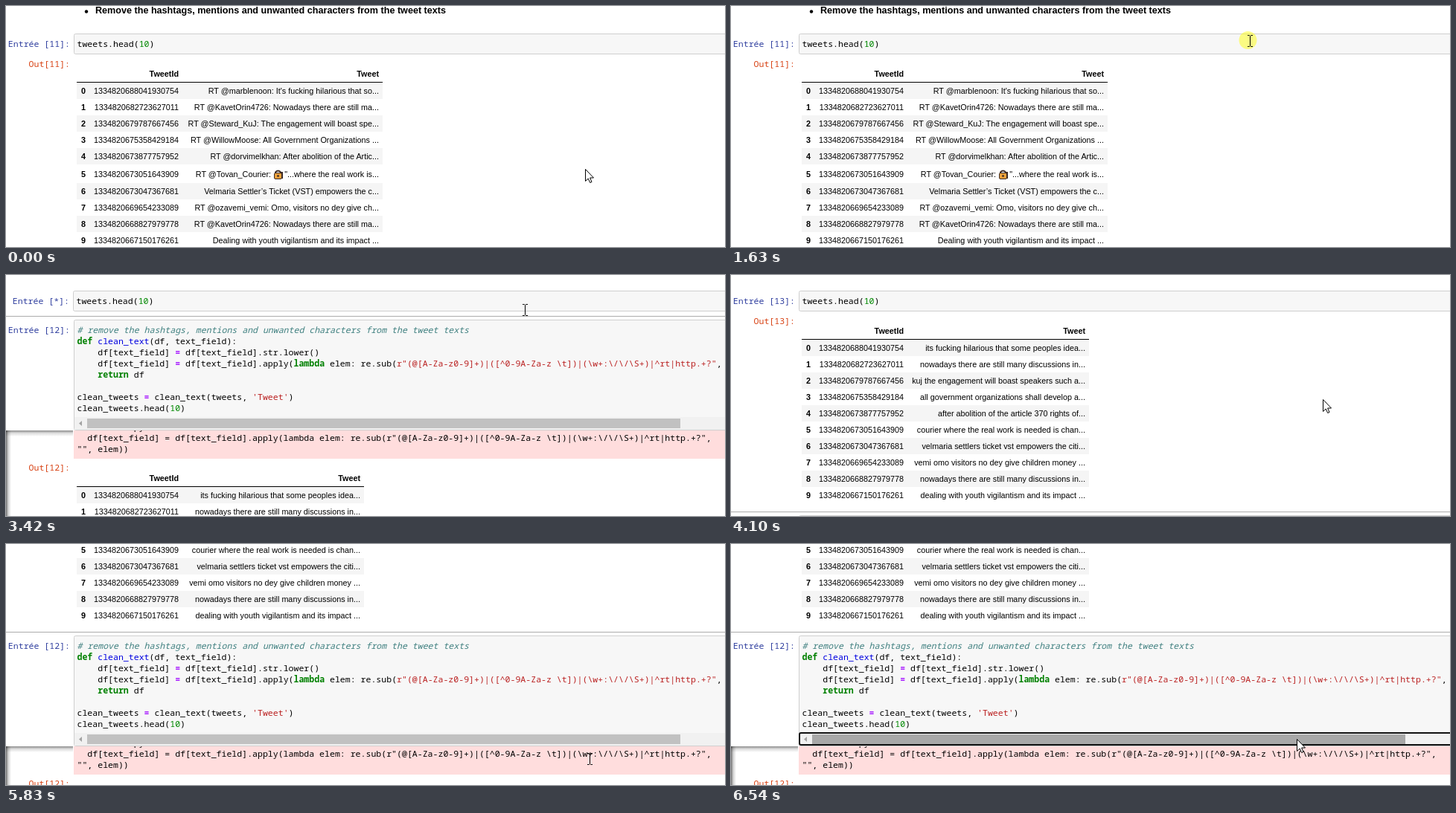
Animation, 966 px wide and 324 px high, one loop 8000 ms. Source, as an HTML page:

```html
<!DOCTYPE html>
<html lang="en">
<head>
<meta charset="utf-8">
<title>Notebook</title>
<style>
html, body { margin: 0; width: 100%; height: 100%; overflow: hidden; background: #fff; }
svg { display: block; width: 966px; height: 324px; }
text { white-space: pre; }
.code { font: 11.55px "Noto Sans Mono", "DejaVu Sans Mono", monospace; }
.cell { font: 10.8px "Liberation Sans", Arial, sans-serif; }
.title { font: bold 12.6px "Liberation Sans", Arial, sans-serif; }
.bold { font-weight: bold; }
.end { text-anchor: end; }
.in { fill: #303f9f; }
.out { fill: #d84315; }
.comment { fill: #408080; font-style: italic; }
.keyword { fill: #008000; font-weight: bold; }
.name { fill: #0000e0; }
.string { fill: #ba2121; }
.number { fill: #008800; }
.op { fill: #aa22ff; font-weight: bold; }
.box { fill: #f7f7f7; stroke: #cfcfcf; }
</style>
</head>
<body>
<svg id="stage" viewBox="0 0 966 324"></svg>
<script>
const LOOP = 8000;

const ids = ['1334820688041930754', '1334820682723627011', '1334820679787667456',
  '1334820675358429184', '1334820673877757952', '1334820673051643909',
  '1334820673047367681', '1334820669654233089', '1334820668827979778', '1334820667150176261'];

const rawTweets = [
  "RT @marblenoon: It's fucking hilarious that so...",
  'RT @KavetOrin4726: Nowadays there are still ma...',
  'RT @Steward_KuJ: The engagement will boast spe...',
  'RT @WillowMoose: All Government Organizations ...',
  'RT @dorvimelkhan: After abolition of the Artic...',
  '"...where the real work is...',
  'Velmaria Settler’s Ticket (VST) empowers the c...',
  'RT @ozavemi_vemi: Omo, visitors no dey give ch...',
  'RT @KavetOrin4726: Nowadays there are still ma...',
  'Dealing with youth vigilantism and its impact ...'];

const cleanTweets = [
  'its fucking hilarious that some peoples idea...',
  'nowadays there are still many discussions in...',
  'kuj the engagement will boast speakers such a...',
  'all government organizations shall develop a...',
  'after abolition of the article 370 rights of...',
  'courier where the real work is needed is chan...',
  'velmaria settlers ticket vst empowers the citi...',
  'vemi omo visitors no dey give children money ...',
  'nowadays there are still many discussions in...',
  'dealing with youth vigilantism and its impact ...'];

const substitution = String.raw`df[text_field] = df[text_field].apply(lambda elem: re.sub(r"(@[A-Za-z0-9]+)|([^0-9A-Za-z \t])|(\w+:\/\/\S+)|^rt|http.+?",`;

const source = [
  '# remove the hashtags, mentions and unwanted characters from the tweet texts',
  'def clean_text(df, text_field):',
  '    df[text_field] = df[text_field].str.lower()',
  '    ' + substitution,
  '    return df',
  '',
  "clean_tweets = clean_text(tweets, 'Tweet')",
  'clean_tweets.head(10)'];

// Drawing helpers: y is the vertical centre of a text line
const text = (x, y, content, cls) => `<text x="${x}" y="${y + 4}" class="${cls}">${content}</text>`;
const rect = (x, y, w, h, attrs) => `<rect x="${x}" y="${y}" width="${w}" height="${h}" ${attrs}/>`;
const group = (dx, dy, content, attrs = '') => `<g transform="translate(${dx} ${dy})" ${attrs}>${content}</g>`;
const box = (y, h) => rect(91.5, y + .5, 900, h, 'rx="2" class="box"');

const tokens = /(#.*)|(r?"[^"]*"|'[^']*')|\b(def|return|lambda)\b|((?<=def )\w+)|\b(\d+)\b|(=)/g;
const kinds = ['comment', 'string', 'keyword', 'name', 'number', 'op'];
const highlight = line => line.replace(tokens, (match, ...groups) =>
  `<tspan class="${kinds[groups.slice(0, 6).findIndex(Boolean)]}">${match}</tspan>`);
const code = (y, line) => text(95.5, y, highlight(line), 'code');
const prompt = (y, label, cls) => text(86, y, label, `code end ${cls}`);

function table(y, right, tweets, tallRow = -1) {
  let top = y + 12;
  let svg = text(232, y, 'TweetId', 'cell bold end') + text(right, y, 'Tweet', 'cell bold end')
    + rect(95, y + 11, right - 90, 1, '');
  tweets.forEach((tweet, i) => {
    const height = i === tallRow ? 25 : 22;
    const mid = top + height / 2;
    if (i % 2 === 0) svg += rect(95, top, right - 90, height, 'fill="#f5f5f5"');
    svg += text(107, mid, i, 'cell bold end') + text(232, mid, ids[i], 'cell end')
      + text(right, mid, tweet, 'cell end');
    top += height;
  });
  return svg;
}

const lock = group(359, 219,
  '<path d="M3 7V4.500a4 4 0 0 1 7 0V7" fill="none" stroke="#3b2a26" stroke-width="2"/>'
  + rect(1.5, 5.500, 10, 8, 'rx="1.500" fill="#eda23c" stroke="#3b2a26"')
  + '<path d="M12 4v9" stroke="#3b2a26" stroke-width="2"/>' + rect(5.500, 8, 2, 3, 'fill="#3b2a26"'));

const headCell = label => box(37, 27) + prompt(51, label, 'in') + code(51, 'tweets.head(10)');

const cleanCell = (attrs = '') =>
  rect(0, 154, 90, 8, 'fill="url(#fadeDown)"') + rect(0, 154, 7, 300, 'fill="url(#fadeRight)"')
  + rect(91, 154, 875, 38, 'fill="#fdd"')
  + text(95.5, 149, 'versus-a-copy', 'code')
  + rect(0, 0, 966, 1, 'fill="#ababab"')
  + box(5, 148) + prompt(19, 'Entrée [12]:', 'in')
  + source.map((line, i) => code(19 + 15 * i, line)).join('')
  + rect(92, 136, 874, 17, 'fill="#f1f1f1"')
  + '<path d="M102 141v7l-4-3.500z" fill="#a3a3a3"/>'
  + rect(109, 138, 797, 13, `fill="#c1c1c1" ${attrs}`)
  + text(95.5, 164, '  ' + substitution, 'code') + text(95.5, 179, '"", elem))', 'code')
  + prompt(204, 'Out[12]:', 'out') + table(218, 476, cleanTweets);

const gradient = (id, axis, alpha) => `<linearGradient id="${id}" x1="0" y1="0" ${axis}>
  <stop stop-opacity="${alpha}"/><stop offset=".45" stop-opacity="${alpha * .3}"/>
  <stop offset="1" stop-opacity="0"/></linearGradient>`;

document.getElementById('stage').innerHTML =
  `<defs>${gradient('fadeDown', 'x2="0" y2="1"', .45)}${gradient('fadeRight', 'x2="1" y2="0"', .55)}</defs>`
  + group(0, 0,
    '<circle cx="108" cy="7.500" r="2.200"/>'
    + text(120, 6, 'Remove the hashtags, mentions and unwanted characters from the tweet texts', 'title')
    + rect(0, 32, 966, 1, 'id="editLine" fill="#66bb6a"')
    + headCell('Entrée [11]:') + rect(199, 43, 1, 15, 'id="caret"')
    + prompt(78, 'Out[11]:', 'out') + table(91, 501, rawTweets, 5)
    + text(356, 225.5, 'RT @Tovan_Courier:', 'cell end') + lock, 'id="before"')
  + group(0, 0, group(-1, -16, headCell('Entrée [*]:')) + group(0, 55, cleanCell()), 'id="running"')
  + group(0, 0,
    group(0, -16, headCell('Entrée [13]:') + prompt(78, 'Out[13]:', 'out') + table(91, 476, cleanTweets))
    + group(0, 318, cleanCell('id="thumb"')
      + rect(92, 136, 900, 16, 'id="focus" rx="2" fill="none" stroke="#111" stroke-width="2"')), 'id="after"')
  + '<circle id="click" r="12" fill="#ff0" fill-opacity=".47"/>'
  + '<path id="arrow" d="M.5.5V16.500L4.200 13 6.700 18.500 9 17.500 6.600 12H11.500Z" fill="#fff" stroke="#000"/>'
  + '<path id="beam" d="M-3.500-7.500H-1L0-6.500 1-7.500H3.500M0-6.500V6.500M-3.500 7.500H-1L0 6.500 1 7.500H3.500" fill="none" stroke="#000"/>';

const el = Object.fromEntries([...document.querySelectorAll('[id]')].map(node => [node.id, node]));

const linear = p => p;
const smooth = p => p * p * (3 - 2 * p);

// start, end, steps, target x, target y, easing
const moves = [
  [70, 850, 12, 698, 66, smooth],
  [920, 1080, 3, 697, 47, linear],
  [3790, 4100, 5, 795, 167, linear],
  [4180, 4340, 3, 817, 257, linear],
  [4650, 5050, 6, 825, 328, smooth],
  [5830, 5830, 1, 784, 289, linear],
  [5900, 6130, 4, 760, 262, linear]];

function pointer(t) {
  let x = 778, y = 219;
  for (const [start, end, steps, toX, toY, ease] of moves) {
    if (t < start) break;
    const gap = (end - start) / Math.max(1, steps - 1);
    const step = t >= end ? steps : Math.floor((t - start + 10) / gap) + 1;
    const p = ease(Math.min(1, step / steps));
    x += (toX - x) * p;
    y += (toY - y) * p;
  }
  return [Math.round(x), Math.round(y)];
}

const show = (node, visible) => node.setAttribute('display', visible ? 'inline' : 'none');
const move = (node, x, y) => node.setAttribute('transform', `translate(${x} ${y})`);

function draw(t) {
  const within = (from, to) => t >= from && t < to;
  show(el.before, t < 3420);
  show(el.running, within(3420, 3490));
  show(el.after, t >= 3490);
  move(el.after, 0, t >= 5830 ? -200 : 0);
  show(el.editLine, t >= 2020);
  show(el.caret, within(2020, 2390));

  const pressed = within(6450, 6540);
  show(el.focus, t >= 6450);
  el.thumb.setAttribute('fill', pressed ? '#787878' : t >= 6050 ? '#a8a8a8' : '#c1c1c1');

  const [x, y] = pointer(t);
  const overText = within(920, 3790) || within(5830, 6050);
  show(el.beam, overText);
  show(el.arrow, !overText);
  move(el.beam, x + .5, y);
  move(el.arrow, x, y);
  show(el.click, pressed || within(1630, 1700));
  move(el.click, overText ? x - 2.5 : x, y - 1);
}

function tick() {
  draw(performance.now() % LOOP);
  requestAnimationFrame(tick);
}
tick();
</script>
</body>
</html>
```
